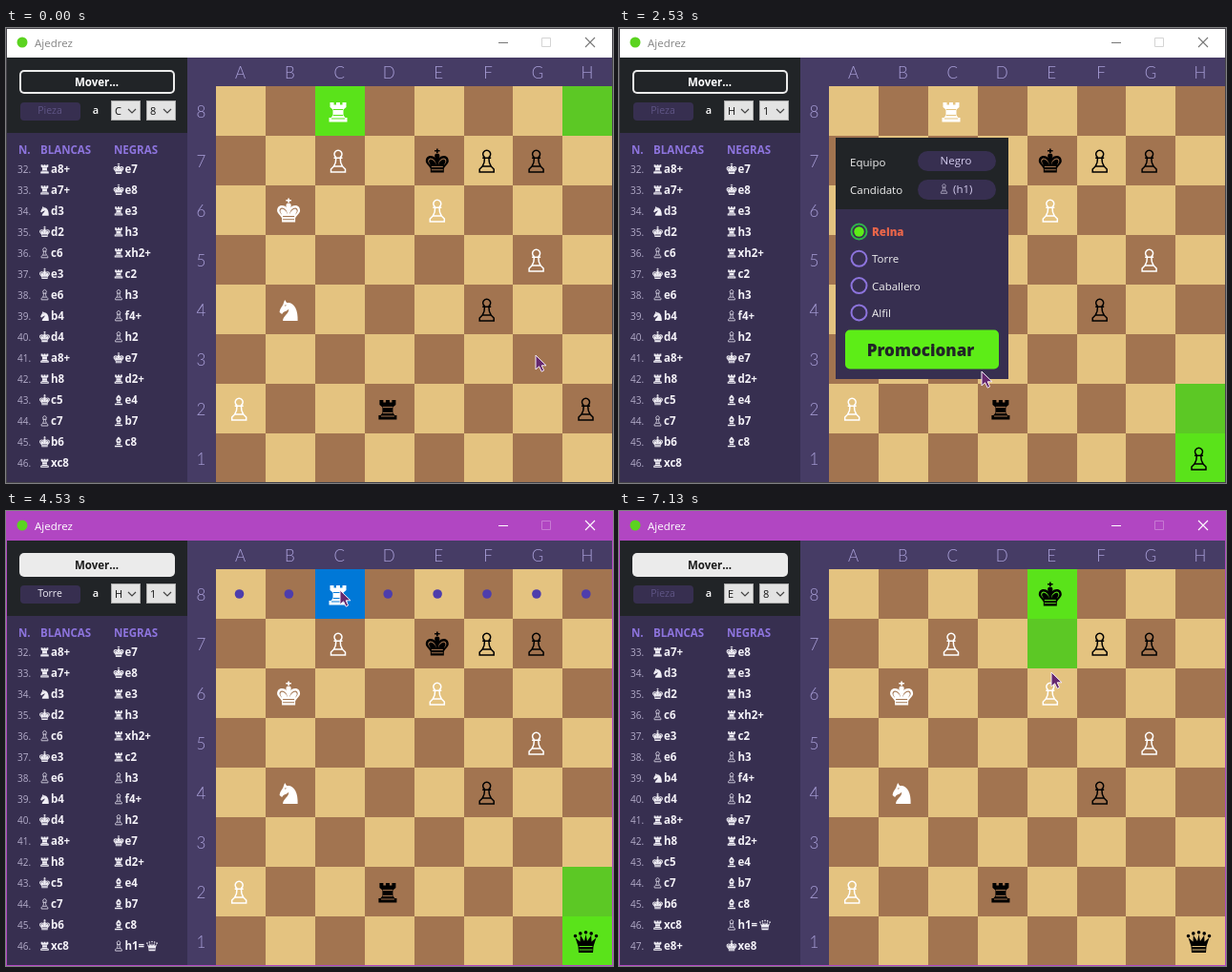
Animation, 636 px wide and 477 px high, one loop 7.94 s. Source, as an HTML page with a canvas:

```html
<!DOCTYPE html>
<html lang="es">
<head>
<meta charset="utf-8">
<title>Ajedrez</title>
<style>
html, body { margin: 0; width: 100%; height: 100%; overflow: hidden; background: #463c65; }
canvas { display: block; }
</style>
</head>
<body>
<canvas id="stage" width="636" height="477"></canvas>
<script>
const ctx = document.getElementById('stage').getContext('2d');
const LOOP = 7940, TICKS_PER_MS = 0.015;
const SANS = '"Open Sans", "Noto Sans", sans-serif';
const DARK = '#212427', PANEL = '#372f50', VIOLET = '#8d74dd', GREEN = '#5ded17';

// Outlines centred on the origin, about 24 units high
const SHAPES = {
  P: 'M-2-3.8A4 4 0 1 1 2-3.8M-4.5-3.3H4.5M-2.2-3.3C-2 1-3 3-4.5 5.5H4.5C3 3 2 1 2.2-3.3M-4.5 5.5L-7.5 8.5V11.5H7.5V8.5L4.5 5.5',
  R: 'M-8.5-9.5h4v2.5h2.5v-2.5h4v2.5h2.5v-2.5h4v5l-3 2.5v6l2 2.5h2v4.5h-19v-4.5h2l2-2.5v-6l-3-2.5z' +
     'M-5-2.5h10v1h-10zM-5 3.5h10v1h-10zM-7 7h14v1h-14z',
  N: 'M-4-10.5L-2-7.5C6-8.5 10 0 9.5 11.5H-6C-6 6 1 4 0-1-2 2-5 1-7 4.5L-9.5 2.5C-9-2-6-4-5.5-6.5zM-4.5-4.5l2-1-.5 1.7z',
  B: 'M0-12C7-6 7-1 3.5 2.5H-3.5C-7-1-7-6 0-12zM-4 3.5H4L5.5 7H-5.5zM-9 8.5H9V12H-9zM-.7-6h1.4v2h2v1.4h-2v2.4h-1.4v-2.4h-2V-4h2z',
  Q: 'M-7.5 11.5L-8 5-11-4.3-6 0-5.7-6.8-1.5-.5 0-7.8 1.5-.5 5.7-6.8 6 0 11-4.3 8 5 7.5 11.5z' +
     'M-7 4.5h14v1h-14zM-7 8h14v1h-14z' +
     [[-11, -6], [-5.7, -8.6], [0, -9.7], [5.7, -8.6], [11, -6]]
       .map(([x, y]) => `M${x - 1.8} ${y}a1.8 1.8 0 1 1 3.6 0a1.8 1.8 0 1 1-3.6 0z`).join(''),
  K: 'M-.8-13h1.6v1.6h2v1.5h-2v1.4h-1.6v-1.4h-2v-1.5h2z' +
     'M0-8C3-8 3-5 2-3 5-7 12-6 12 0 12 3 8 5 7 8V12H-7V8C-8 5-12 3-12 0-12-6-5-7-2-3-3-5-3-8 0-8z' +
     'M-1.2 4C-1-2-9-6-9.6 0-9.4 2-8 3-6.8 4.6-8 2-8.8 1.5-8.6 0-8-4-2-1-1.2 4z' +
     'M1.2 4C1-2 9-6 9.6 0 9.4 2 8 3 6.8 4.6 8 2 8.8 1.5 8.6 0 8-4 2-1 1.2 4z' +
     'M-6 5.5h12v1h-12zM-6 8.7h12v1h-12z'
};
const PATHS = Object.fromEntries(Object.entries(SHAPES).map(([k, d]) => [k, new Path2D(d)]));
const ARROW = new Path2D('M0 0V15L3.6 11.8 6.2 17.2 8.6 16 6.2 10.8H11z');

const MOVES = ('Ra8+ Ke7 Ra7+ Ke8 Nd3 Re3 Kd2 Rh3 Pc6 Rxh2+ Ke3 Rc2 Pe6 Ph3 Nb4 Pf4+ Kd4 Ph2 ' +
  'Ra8+ Ke7 Rh8 Rd2+ Kc5 Be4 Pc7 Bb7 Kb6 Bc8 Rxc8 Ph1=Q Re8+ Kxe8').split(' ');

// Key times, in ticks
const T = { pickPawn: 10, dropPawn: 17, ask: 18, hover: 39, close: 43, queen: 44,
            pickRook: 67, dropRook: 76, pickKing: 92, dropKing: 98 };

// Pointer path: tick, x, y
const POINTER = [
  [0, 555, 343], [3, 625, 408], [5, 625, 408], [9, 607, 402], [10, 607, 402], [16, 606, 445],
  [20, 606, 445], [29, 533, 416], [38, 380, 360], [41, 359, 343], [46, 359, 343], [50, 413, 322],
  [56, 413, 322], [65, 350, 83], [68, 350, 83], [74, 457, 93], [76, 457, 93], [83, 447, 136],
  [93, 447, 136], [97, 452, 95], [98, 452, 95], [104, 453, 166], [106, 453, 166], [107, 453, 169]
];

function pointerAt(k) {
  const i = POINTER.findIndex(p => p[0] > k);
  if (i < 0) return POINTER[POINTER.length - 1].slice(1);
  const [t0, x0, y0] = POINTER[i - 1], [t1, x1, y1] = POINTER[i];
  const f = (k - t0) / (t1 - t0);
  return [Math.round(x0 + (x1 - x0) * f), Math.round(y0 + (y1 - y0) * f)];
}

function rect(x, y, w, h, color) {
  ctx.fillStyle = color;
  ctx.fillRect(x, y, w, h);
}

function rounded(x, y, w, h, r, color) {
  ctx.beginPath();
  ctx.roundRect(x, y, w, h, r);
  ctx.fillStyle = color;
  ctx.fill();
}

function disc(x, y, r, color) {
  ctx.beginPath();
  ctx.arc(x, y, r, 0, 7);
  ctx.fillStyle = color;
  ctx.fill();
}

function ring(x, y, r, color) {
  ctx.beginPath();
  ctx.arc(x, y, r, 0, 7);
  ctx.strokeStyle = color;
  ctx.lineWidth = 2;
  ctx.stroke();
}

function lines(d, color, width = 1) {
  ctx.strokeStyle = color;
  ctx.lineWidth = width;
  ctx.stroke(new Path2D(d));
}

// y is the baseline
function text(s, x, y, font, color, align = 'left') {
  ctx.font = font;
  ctx.fillStyle = color;
  ctx.textAlign = align;
  ctx.fillText(s, x, y);
}

function glyph(type, x, y, color, scale = 1) {
  ctx.save();
  ctx.translate(x, y);
  ctx.scale(scale, scale);
  if (type === 'P') {
    ctx.strokeStyle = color;
    ctx.lineWidth = scale < 1 ? 2.2 : 1.5;
    ctx.stroke(PATHS.P);
  } else {
    ctx.fillStyle = color;
    ctx.fill(PATHS[type], 'evenodd');
  }
  ctx.restore();
}

const cell = sq => [sq.charCodeAt(0) - 97, 8 - sq[1]];
const left = c => Math.round(220 + 51.9 * c);

function square(sq, tones) {
  const [c, r] = cell(sq);
  rect(left(c), 61 + 52 * r, left(c + 1) - left(c), 52, tones[(c + r) % 2]);
}

function piece(code, sq, color) {
  const [c, r] = cell(sq);
  glyph(code, 244.2 + 51.9 * c, 87.5 + 52 * r, color);
}

function selection(k) {
  if (k >= T.pickPawn && k < T.dropPawn) return { sq: 'h2', name: 'Peón', to: ['h1'] };
  if (k >= T.pickRook && k < T.dropRook)
    return { sq: 'c8', name: 'Torre', to: [...'abdefgh'].map(f => f + 8) };
  if (k >= T.pickKing && k < T.dropKing) return { sq: 'e7', name: 'Rey', to: ['d6', 'e8'] };
  return null;
}

function drawTitle(active) {
  rect(0, 0, 636, 31, active ? '#b146c2' : '#fff');
  disc(17, 15, 5.5, '#5bd320');
  text('Ajedrez', 30, 20, `11.5px ${SANS}`, active ? '#fff' : '#858585');
  const ink = active ? '#fff' : '#777';
  lines('M516 15.5H526', ink);
  lines('M561.5 10.5H570.5V19.5H561.5Z', active ? '#c77ad3' : '#d4d4d4');
  lines('M607 10L617 20M617 10L607 20', ink, 1.1);
}

function combo(x, value) {
  rect(x, 76, 31, 21, '#adadad');
  rect(x + 1, 77, 29, 19, '#e3e3e3');
  text(value, x + 4, 91, `11px ${SANS}`, '#111');
  lines(`M${x + 18} 85L${x + 22} 89L${x + 26} 85`, '#444', 1.2);
}

function drawControls(k, sel) {
  rect(1, 31, 189, 79, DARK);
  const blackToMove = k < T.queen || (k >= T.dropRook && k < T.dropKing);
  rounded(14, 44, 163, 25, 5, '#ebebeb');
  if (blackToMove) rounded(16, 46, 159, 21, 3, DARK);
  text('Mover...', 95, 61, `bold 11.5px ${SANS}`, blackToMove ? '#fff' : '#1b1b1b', 'center');
  rounded(15, 78, 63, 19, 4, PANEL);
  text(sel ? sel.name : 'Pieza', 46, 90, `10.5px ${SANS}`, sel ? '#efedf6' : '#5f5585', 'center');
  text('a', 94, 90, `600 11px ${SANS}`, '#fff', 'center');
  const to = k < T.dropPawn ? 'C8' : k < T.dropRook ? 'H1' : 'E8';
  combo(110, to[0]);
  combo(147, to[1]);
}

function drawMove(move, x, y) {
  const [body, promoted] = move.slice(1).split('=');
  glyph(move[0], x + 5, y, move[0] === 'P' ? '#c9c5d6' : '#f0eef5', 0.45);
  text(promoted ? body + '=' : body, x + 11.5, y + 4.5, `bold 11.5px ${SANS}`, '#f4f2f8');
  if (promoted) glyph(promoted, x + 40, y, '#f0eef5', 0.46);
}

function drawMoves(k) {
  rect(1, 110, 189, 366, PANEL);
  text('N.', 13, 132, `bold 11.5px ${SANS}`, VIOLET);
  text('BLANCAS', 36, 132, `bold 11.5px ${SANS}`, VIOLET);
  text('NEGRAS', 113, 132, `bold 11.5px ${SANS}`, VIOLET);
  const count = k < T.queen ? 29 : k < T.dropRook ? 30 : k < T.dropKing ? 31 : 32;
  const first = k < T.dropRook ? 0 : 1;
  for (let i = 0; i < 15; i++) {
    const n = first + i, y = 147.5 + 22.03 * i;
    text(`${32 + n}.`, 12, y + 4.5, `10px ${SANS}`, '#b5aecb');
    drawMove(MOVES[2 * n], 35.5, y);
    if (2 * n + 1 < count) drawMove(MOVES[2 * n + 1], 113, y);
  }
}

function drawBoard(k, sel) {
  rect(190, 31, 446, 446, '#463c65');
  for (let i = 0; i < 8; i++) {
    const font = '300 17px Lato, sans-serif';
    text('ABCDEFGH'[i], 245.5 + 51.9 * i, 53, font, '#a99fd8', 'center');
    text(8 - i, 204.5, 94 + 52 * i, font, '#a99fd8', 'center');
    for (const f of 'abcdefgh') square(f + (8 - i), ['#e4c380', '#a27450']);
  }
  const last = k < T.dropPawn ? ['c8', 'h8'] : k < T.dropRook ? ['h1', 'h2']
    : k < T.dropKing ? ['c8', 'e8'] : ['e7', 'e8'];
  last.forEach(sq => square(sq, ['#5ae31a', '#5cc825']));
  if (sel) square(sel.sq, ['#0078d7', '#0078d7']);

  const white = ['Pc7', 'Kb6', 'Pe6', 'Pg5', 'Nb4', 'Pa2'];
  if (k < T.dropKing) white.push(k < T.dropRook ? 'Rc8' : 'Re8');
  const black = ['Pf7', 'Pg7', 'Pf4', 'Rd2',
    k < T.dropPawn ? 'Ph2' : k < T.queen ? 'Ph1' : 'Qh1',
    k < T.dropKing ? 'Ke7' : 'Ke8'];
  white.forEach(p => piece(p[0], p.slice(1), '#fff'));
  black.forEach(p => piece(p[0], p.slice(1), '#000'));
  if (sel) for (const sq of sel.to) {
    const [c, r] = cell(sq);
    disc(244.5 + 51.9 * c, 87 + 52 * r, 4.8, '#4d3dac');
  }
}

function drawDialog(k) {
  rect(227, 115, 181, 253, PANEL);
  rect(227, 115, 181, 75, DARK);
  const font = `11.5px ${SANS}`;
  text('Equipo', 242, 145, font, '#f0f0f0');
  text('Candidato', 242, 174, font, '#f0f0f0');
  rounded(313, 129, 82, 21, 10.5, PANEL);
  rounded(313, 159, 82, 21, 10.5, PANEL);
  text('Negro', 353, 143, font, '#d3cbed', 'center');
  glyph('P', 340.5, 168.5, '#aaa3bd', 0.42);
  text('(h1)', 350, 173, font, '#d3cbed');
  ['Reina', 'Torre', 'Caballero', 'Alfil'].forEach((name, i) => {
    const y = 213.5 + 28.3 * i;
    ring(251.5, y, 8, i ? VIOLET : '#2fb54a');
    if (!i) disc(251.5, y, 5.2, GREEN);
    text(name, 265, y + 4.5, i ? font : `800 11.5px ${SANS}`, i ? '#f0f0f0' : '#e8654a');
  });
  rounded(237, 316.5, 161, 41, 5, k < T.hover ? GREEN : '#50d012');
  text('Promocionar', 316, 344, `800 17px ${SANS}`, DARK, 'center');
}

function drawPointer(k) {
  ctx.save();
  ctx.translate(...pointerAt(k));
  ctx.lineJoin = 'round';
  ctx.fillStyle = '#65286f';
  ctx.fill(ARROW);
  ctx.strokeStyle = '#f4eaf6';
  ctx.lineWidth = 1;
  ctx.stroke(ARROW);
  ctx.restore();
}

function draw(k) {
  const active = (k >= T.pickPawn && k < T.ask) || k >= T.queen;
  const sel = selection(k);
  drawTitle(active);
  drawControls(k, sel);
  drawMoves(k);
  drawBoard(k, sel);
  ctx.strokeStyle = active ? '#b146c2' : '#45434a';
  ctx.lineWidth = 1;
  ctx.strokeRect(0.5, 0.5, 635, 476);
  if (k >= T.ask && k < T.close) drawDialog(k);
  drawPointer(k);
}

const start = performance.now();
function frame() {
  const t = (performance.now() - start) % LOOP;
  draw(Math.floor((t + 4) * TICKS_PER_MS));
  requestAnimationFrame(frame);
}
frame();
</script>
</body>
</html>
```
